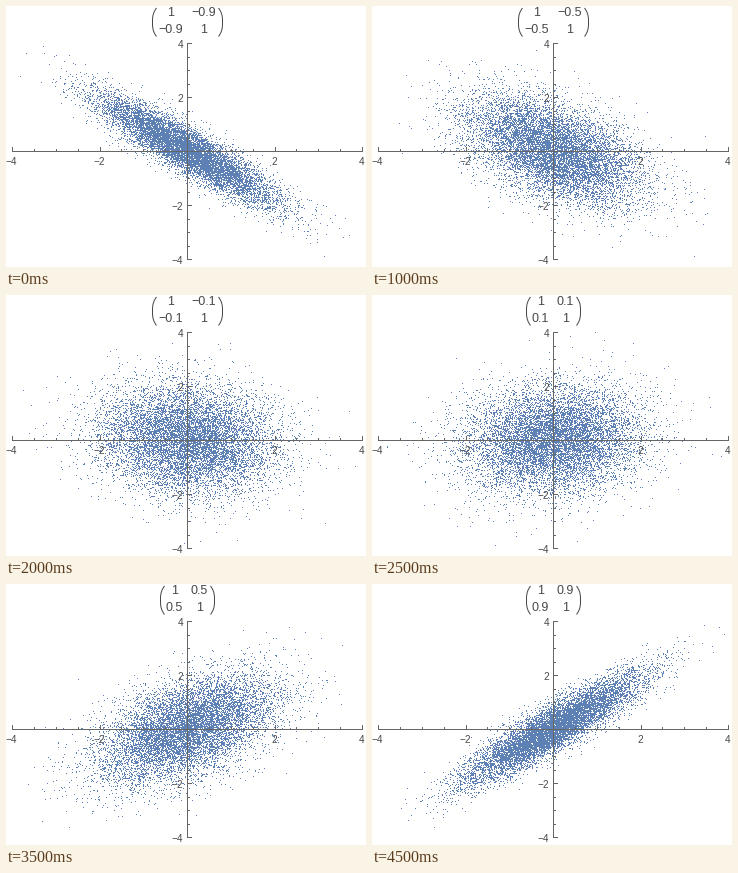
A matplotlib script for the animation above (4750 ms loop, 360 px wide and 261 px high).

```python
import numpy as np
import matplotlib.pyplot as plt
from matplotlib.animation import ArtistAnimation
from matplotlib.patches import PathPatch
from matplotlib.path import Path

W, H, DPI = 360, 261, 72
X0, Y0 = 181, 145              # pixel that holds the origin
SX, SY = 43.75, 27.0           # pixels per unit
LIMIT = 4
SAMPLES = 10000
STEP_MS = 250
BLUE, GREY, TEXT = "#5e81b5", "#666666", "#484848"

plt.rcParams["font.family"] = "Liberation Sans"
fig = plt.figure(figsize=(W / DPI, H / DPI), dpi=DPI, facecolor="white")
ax = fig.add_axes([0, 0, 1, 1])
ax.set(xlim=(0, W), ylim=(H, 0))
ax.axis("off")


def px(x):
    return X0 + SX * x


def py(y):
    return Y0 - SY * y


def label(x, y, text, size, ha="center"):
    return ax.text(x, y, text, fontsize=size, ha=ha, va="baseline",
                   color=TEXT, zorder=4)


def line(xs, ys):
    ax.plot(xs, ys, color=GREY, lw=1, solid_capstyle="projecting", zorder=3)


def number(value):
    return f"{value:g}".replace("-", "\u2212")


def draw_axes():
    line([px(-LIMIT), px(LIMIT)], [Y0, Y0])
    line([X0, X0], [py(LIMIT), py(-LIMIT)])
    for v in np.arange(-LIMIT, LIMIT + 0.5, 0.5):
        major = v % 2 == 0
        size = 4 if major else 2
        line([px(v), px(v)], [Y0, Y0 - size])
        line([X0, X0 + size], [py(v), py(v)])
        if major and v:
            label(px(v) - 0.5, Y0 + 14, number(v), 10)
            label(X0 - 3.5, py(v) + 4.5, number(v), 10, ha="right")


def paren(x, side):
    """Tall bracket whose outermost edge is at x; side is -1 (left) or 1."""
    tip = x - 4 * side
    top, bottom = 2, 30.5
    points = [(tip, top), (x, top + 5), (x, top + 12), (x, bottom - 12),
              (x, bottom - 5), (tip, bottom)]
    codes = [Path.MOVETO, Path.CURVE3, Path.CURVE3, Path.LINETO,
             Path.CURVE3, Path.CURVE3]
    patch = PathPatch(Path(points, codes), fill=False, ec=TEXT, lw=1, zorder=4)
    return ax.add_patch(patch)


def matrix(rho):
    text = number(rho) if rho else "0."
    gap = 16.5 if rho < 0 else 12.5 if rho > 0 else 9
    edge = gap + (18.5 if rho < 0 else 14.5 if rho > 0 else 11.5)
    left, right = X0 - gap, X0 + gap
    middle = X0 + 0.5
    return [label(left, 10, "1", 12.5), label(right, 10, text, 12.5),
            label(left, 27, text, 12.5), label(right, 27, "1", 12.5),
            paren(middle - edge, -1), paren(middle + edge, 1)]


def cloud(rho, seed):
    rng = np.random.default_rng(seed)
    x, noise = rng.standard_normal((2, SAMPLES))
    y = rho * x + np.sqrt(1 - rho**2) * noise
    inside = (abs(x) <= LIMIT) & (abs(y) <= LIMIT)
    return ax.plot(px(x[inside]), py(y[inside]), ",", color=BLUE, zorder=2)


draw_axes()
frames = []
for i in range(19):
    rho = (i - 9) / 10
    frames.append(cloud(rho, 40 + i) + matrix(rho))

anim = ArtistAnimation(fig, frames, interval=STEP_MS, repeat=True,
                       repeat_delay=0)
plt.show()
```
